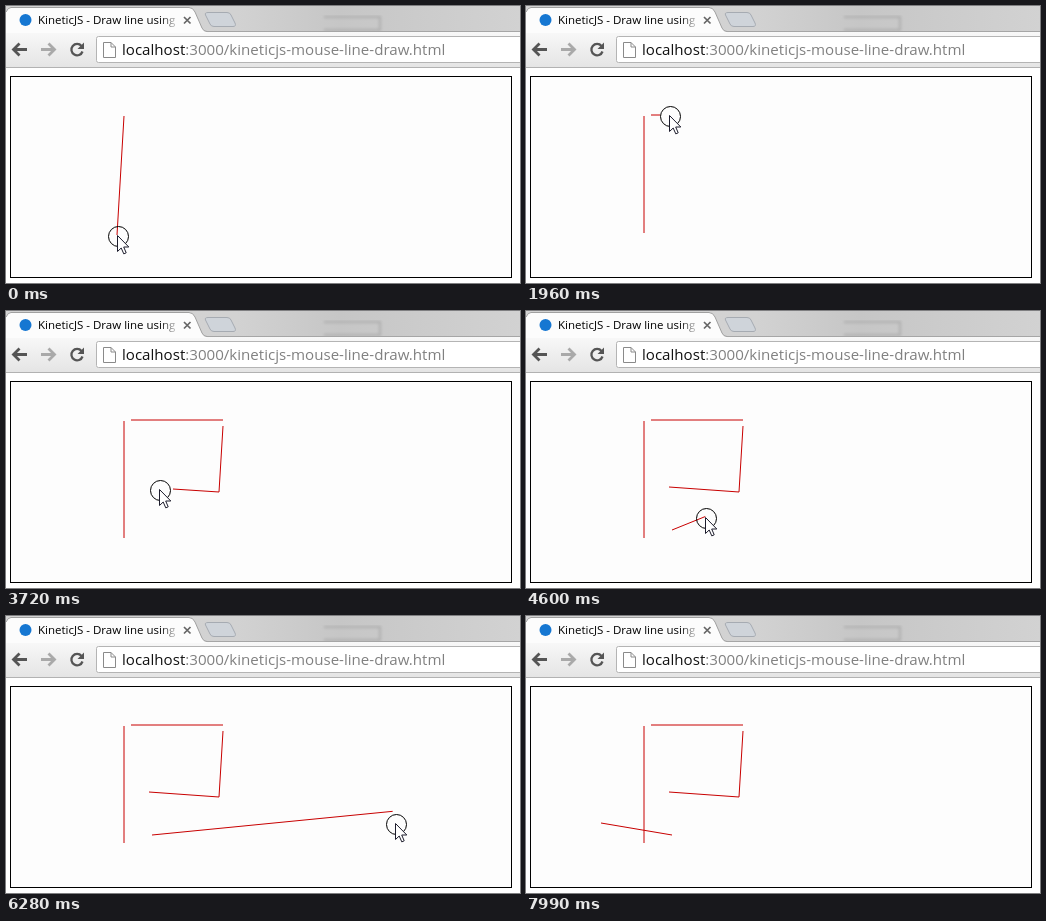
Write an HTML page that moves like this. It is 514x277 px and loops after 8.63 s.

```html
<!DOCTYPE html>
<html lang="en">
<head>
<meta charset="utf-8">
<title>Line drawing</title>
<style>
html, body { margin: 0; width: 100%; height: 100%; overflow: hidden; background: #fff; }
svg { display: block; width: 514px; height: 277px; }
text { font-family: "Open Sans", "Noto Sans", sans-serif; }
</style>
</head>
<body>
<svg viewBox="0 0 514 277">
  <defs>
    <linearGradient id="glass">
      <stop offset="0" stop-color="#d3d3d3"/>
      <stop offset=".45" stop-color="#d2d2d2"/>
      <stop offset=".65" stop-color="#c6c6c6"/>
      <stop offset="1" stop-color="#d2d2d2"/>
    </linearGradient>
    <linearGradient id="bar" x2="0" y2="1">
      <stop offset="0" stop-color="#f8f8f8"/>
      <stop offset="1" stop-color="#e4e4e4"/>
    </linearGradient>
    <linearGradient id="fade">
      <stop offset="0" stop-color="#fcfcfc" stop-opacity="0"/>
      <stop offset="1" stop-color="#fcfcfc"/>
    </linearGradient>
    <filter id="soft"><feGaussianBlur stdDeviation="1.5"/></filter>
  </defs>

  <rect width="514" height="28" fill="url(#glass)"/>
  <path d="M318 11H374V24H318" fill="none" stroke="#adadad" stroke-width="2" filter="url(#soft)"/>

  <rect y="26" width="514" height="36" fill="url(#bar)"/>
  <path d="M0 25.5H514" stroke="#a6a6a6"/>
  <path d="M0 61.5H514" stroke="#b2b2b2"/>
  <path d="M0 27V6Q2 1.500 5 1.500H183Q187 1.500 189 6L196 22Q197.500 25.500 201 25.500V27Z" fill="#fcfcfc"/>
  <path d="M0 6Q2 1.500 5 1.500H183Q187 1.500 189 6L196 22Q197.500 25.500 201 25.500" fill="none" stroke="#a0a0a0"/>
  <path d="M202 6.500H221Q224 6.500 225 9L229 17Q230.500 20.500 227 20.500H208Q205 20.500 204 18L199.500 9Q198.500 6.500 202 6.500Z" fill="#cfd4da" stroke="#a6abb2"/>

  <circle cx="19.500" cy="14" r="6" fill="#1677d2"/>
  <text x="32" y="18" font-size="11.500">KineticJS - Draw line using</text>
  <rect x="154" y="5" width="20" height="18" fill="url(#fade)"/>
  <path d="M178 11L184.500 17.500M184.500 11L178 17.500" stroke="#666" stroke-width="1.700"/>

  <g fill="none" stroke-width="2.800">
    <path d="M21 43.500H8M13.500 37.500L7.500 43.500L13.500 49.500" stroke="#555"/>
    <path d="M35 43.500H48M42.500 37.500L48.500 43.500L42.500 49.500" stroke="#a9a9a9"/>
    <path d="M75.500 40A5.700 5.700 0 1 0 76.500 45.500" stroke="#555" stroke-width="2.300"/>
  </g>
  <path d="M78 36.500V43H71.500Z" fill="#555"/>

  <rect x="90.500" y="30.500" width="430" height="26" rx="2" fill="#fff" stroke="#b4b4b4"/>
  <path d="M97.500 36.500H105L109.500 41V51.500H97.500ZM105 36.500V41H109.500" fill="#fff" stroke="#8a8a8a"/>
  <text x="116" y="49" font-size="15.100" fill="#808080"><tspan fill="#111">localhost</tspan>:3000/kineticjs-mouse-line-draw.html</text>

  <rect x="4.500" y="70.500" width="501" height="201" fill="#fdfdfd" stroke="#000"/>
  <g id="lines" stroke="#c80000" fill="none"></g>
  <g id="pointer">
    <circle id="ring" cx="1.500" cy="1.500" r="10" fill="none" stroke="#000"/>
    <path transform="translate(.5 .5)" d="M0 0V16L3.700 12.500L6.300 18.400L8.700 17.300L6.200 11.500H11.300Z" fill="#fff" stroke="#1c1c2c"/>
  </g>
</svg>
<script>
const LOOP = 8630;
const TICK = 142.7; // the screen refreshes once per tick
const LEAD = 52;
const LAG = 0.5;    // the stroke trails the pointer, in ticks
const GONE = 56;

// Corners of the pointer's route: [tick, x, y]
const route = [
  [0, 111, 229], [7.5, 118, 227], [10, 118, 227], [13, 125, 109],
  [18, 217, 109], [19, 217, 109], [21, 217, 115], [24, 213, 181],
  [25, 208, 182], [25.5, 167, 178], [26, 153, 178], [27, 143, 176],
  [30, 144, 195], [31, 146, 219], [36.5, 329, 145], [37, 350, 141],
  [38.5, 375, 137], [41, 375, 137], [44, 389, 207], [45, 376, 221],
  [49, 123, 203], [51.5, 75, 207], [52, 75, 207], [55, 219, 247]
];

const strokes = [
  { down: 0, up: 11, from: [118, 110], to: [118, 227] },
  { down: 13, up: 19, from: [125, 109], to: [217, 109] },
  { down: 21, up: 24, from: [217, 115], to: [213, 181] },
  { down: 24, up: 28, from: [213, 181], to: [143, 176] },
  { down: 32, up: 55, from: [146, 219], to: [75, 207] }
];

const $ = id => document.getElementById(id);
const show = (el, on) => el.setAttribute("display", on ? "inline" : "none");

for (const s of strokes) {
  s.el = document.createElementNS("http://www.w3.org/2000/svg", "path");
  $("lines").append(s.el);
}

function pointerAt(t) {
  const i = route.findIndex(k => k[0] > t);
  if (i < 0) return route[route.length - 1].slice(1);
  const [t0, x0, y0] = route[i - 1], [t1, x1, y1] = route[i];
  const p = (t - t0) / (t1 - t0);
  return [x0 + (x1 - x0) * p, y0 + (y1 - y0) * p];
}

function drawStroke({ el, down, up, from, to }, t) {
  const end = t < up ? pointerAt(Math.max(t - LAG, down)) : to;
  el.setAttribute("d", `M${from}L${end}`);
  show(el, t >= down);
}

function render(ms) {
  const t = Math.min(GONE, Math.floor((ms + LEAD) / TICK));
  for (const s of strokes) drawStroke(s, t);
  const [x, y] = pointerAt(t).map(Math.round);
  $("pointer").setAttribute("transform", `translate(${x} ${y})`);
  show($("pointer"), t < GONE);
  show($("ring"), strokes.some(s => t >= s.down && t < s.up));
}

const start = performance.now();
function tick() {
  render((performance.now() - start) % LOOP);
  requestAnimationFrame(tick);
}
tick();
</script>
</body>
</html>
```
